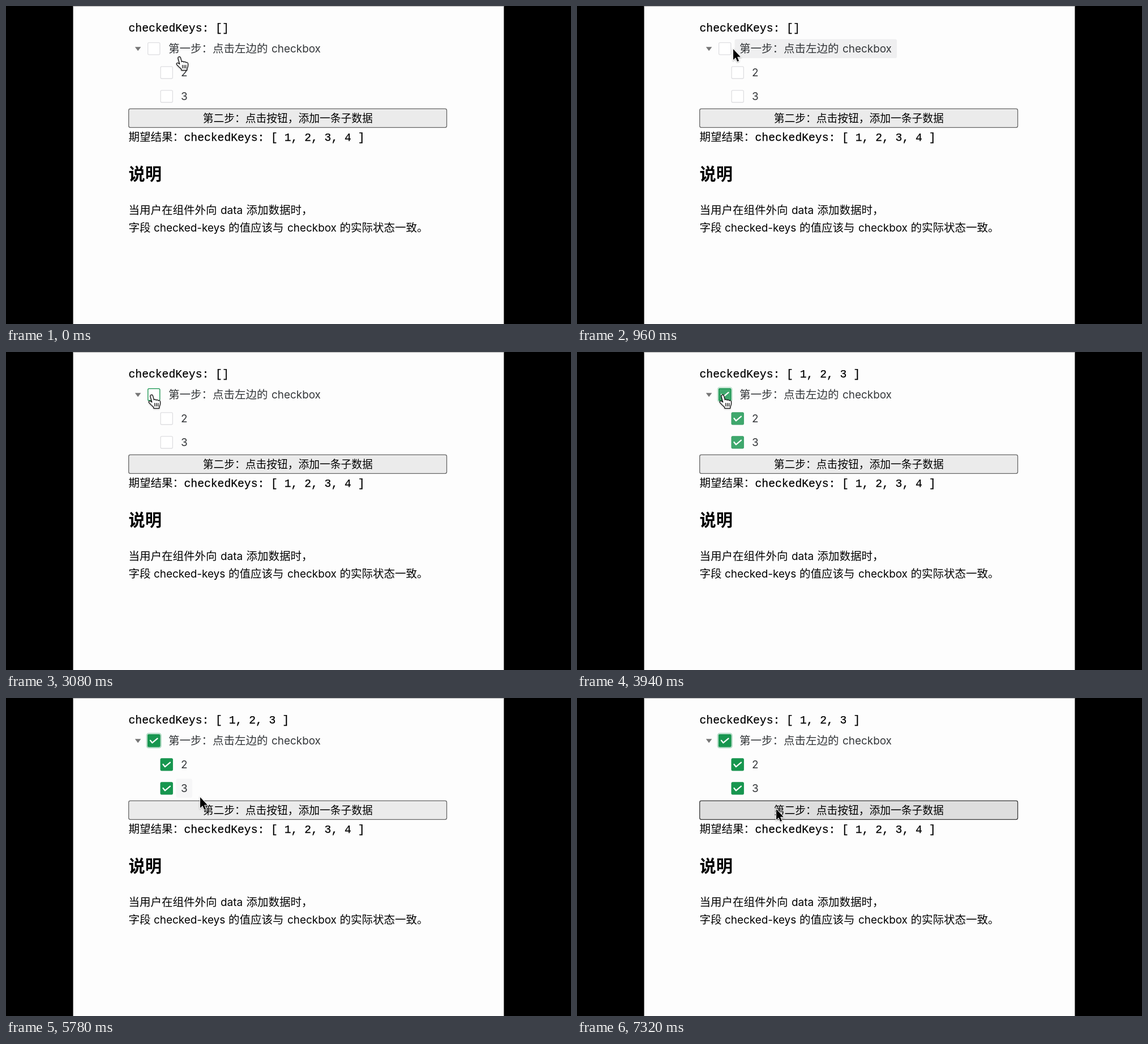
An HTML page that plays this animation: 998 by 561 pixels, repeating every 8000 ms.

```html
<!DOCTYPE html>
<html lang="zh-CN">
<head>
<meta charset="utf-8">
<style>
  html, body { margin: 0; width: 100%; height: 100%; overflow: hidden; background: #000; }
  svg { display: block; width: 998px; height: 561px; }
  text { font: 19.5px "Noto Sans CJK SC", "Noto Sans CJK", sans-serif; white-space: pre; }
  .latin { font-family: Inter, sans-serif; font-size: 18.9px; }
  .mono { font-family: "Liberation Mono", monospace; font-size: 19.7px; stroke: #000; stroke-width: 0.25px; }
  .node { fill: #333639; }
  #arrow, #hand { filter: drop-shadow(0 1px 1px #0005); }
</style>
</head>
<body>
<svg viewBox="0 0 998 561">
  <rect x="118.6" width="760.8" height="561" fill="#fdfdfd"/>
  <rect x="118.6" width="760.8" height="1" fill="#aaa"/>

  <text id="keys" class="mono" x="216.5" y="45"></text>

  <rect id="rowOne" x="278.5" y="58.5" width="286.5" height="33.5" rx="3" fill="#efeff0"/>
  <rect id="rowThree" x="300.5" y="142.5" width="28.5" height="33.5" rx="3" fill="#efeff0"/>
  <path d="M227.8 72.3h10.6l-5.3 7z" fill="#767676"/>
  <g id="boxes"></g>
  <text class="node" x="287" y="82">第一步：点击左边的<tspan class="latin" x="469">checkbox</tspan></text>
  <text class="node latin" x="309" y="124">2</text>
  <text class="node latin" x="309" y="166">3</text>

  <rect id="button" x="216.7" y="181.4" width="561.8" height="33" rx="2.8" stroke-width="1.3"/>
  <text x="497.7" y="205.3" text-anchor="middle" style="font-size:18.75px">第二步：点击按钮，添加一条子数据</text>
  <text x="216.5" y="238.3">期望结果：<tspan class="mono" x="314.5">checkedKeys: [ 1, 2, 3, 4 ]</tspan></text>
  <text x="216.5" y="307" style="font-size:29.2px;font-weight:700">说明</text>
  <text x="216.5" y="367">当用户在组件外向<tspan class="latin" x="379">data</tspan><tspan x="424.5">添加数据时，</tspan></text>
  <text x="216.5" y="398">字段<tspan class="latin" x="261">checked-keys</tspan><tspan x="393">的值应该与</tspan><tspan class="latin" x="497">checkbox</tspan><tspan x="589.5">的实际状态一致。</tspan></text>

  <path id="arrow" d="M0 0V19L4.2 15L7.2 22L10 20.7L7.1 13.8H12.8Z" stroke="#fff" stroke-width="2" paint-order="stroke"/>
  <g id="hand" fill="#fff" stroke="#111" stroke-width="1.3" stroke-linejoin="round" stroke-linecap="round">
    <path d="M-2.2 2C-2.4-1 1.6-1.4 2.4 1.4L4.4 8.6C5 7.2 7.6 7.4 8 9.2C9 7.8 11.4 8.2 12 10C13 8.8 15.2 9.4 15.4 11.5C15.9 15 15.2 18 13.8 20.4L13.6 23.4H4L3.5 21C0 18-2.3 15.7-4.3 13.3C-5.6 11.3-3.4 9.5-1.4 10.9L.8 12.6Z"/>
    <path d="M5.6 14.5l.3 5M8.6 14.5l.2 5M11.6 14.5v5"/>
  </g>
</svg>
<script>
const LOOP = 8000;
const $ = id => document.getElementById(id);
const clamp = v => Math.min(1, Math.max(0, v));
const ease = v => v * v * (3 - 2 * v);
const ramp = (t, from, to) => ease(clamp((t - from) / (to - from)));
const mix = (a, b, k) => a + (b - a) * k;
const gray = v => `rgb(${v},${v},${v})`;

// Pointer stops: time, x, y
const stops = [
  [20, 306, 90], [820, 278, 80], [960, 276, 76], [1560, 258, 77], [2100, 257, 76],
  [4200, 257, 76], [4940, 264, 119], [5040, 264, 119], [5780, 343, 175],
  [5880, 343, 175], [6620, 369, 198], [6720, 369, 198], [7160, 352, 196]
];

// Areas with a hand pointer: left, top, right, bottom
const links = [
  [250, 64, 272.5, 87], [278.5, 58, 565, 92],
  [273, 106, 295, 129], [301, 142, 329, 176]
];

const boxes = [[261.2, 75.2], [283.7, 117.4], [283.7, 159.4]].map(([x, y]) => {
  $('boxes').insertAdjacentHTML('beforeend', `<g transform="translate(${x} ${y})">
    <rect x="-13.6" y="-13.6" width="27.2" height="27.2" rx="4.5" fill="#b4dcc6" opacity="0"/>
    <rect x="-10.6" y="-10.6" width="21.2" height="21.2" rx="2" fill="#fff" stroke="#dedee1" stroke-width="1.3"/>
    <rect x="-10.5" y="-10.5" width="21" height="21" rx="2" fill="none" stroke="#17964f" stroke-width="1.3" opacity="0"/>
    <g opacity="0">
      <rect x="-11.2" y="-11.2" width="22.4" height="22.4" rx="2.5" fill="#17964f"/>
      <path d="M-6.3-.4L-2.9 3.9L6.3-3.8" fill="none" stroke="#fff" stroke-width="2.2" stroke-linecap="round" stroke-linejoin="round"/>
    </g></g>`);
  const [ring, , border, fill] = $('boxes').lastElementChild.children;
  return { ring, border, fill };
});

function pointerAt(t) {
  const i = stops.findIndex(s => s[0] > t);
  if (i === 0) return stops[0].slice(1);
  if (i < 0) return stops[stops.length - 1].slice(1);
  const [a, b] = [stops[i - 1], stops[i]];
  const k = ramp(t, a[0], b[0]);
  return [mix(a[1], b[1], k), mix(a[2], b[2], k)];
}

function draw(t) {
  $('keys').textContent = t < 3660 ? 'checkedKeys: []' : 'checkedKeys: [ 1, 2, 3 ]';
  $('rowOne').setAttribute('opacity', ramp(t, 20, 500) - ramp(t, 2680, 3080));
  $('rowThree').setAttribute('opacity', ramp(t, 5300, 5550) - ramp(t, 5600, 5960));

  boxes[0].border.setAttribute('opacity', ramp(t, 1300, 2100));
  boxes[0].ring.setAttribute('opacity', ramp(t, 3380, 4180));
  for (const box of boxes) box.fill.setAttribute('opacity', ramp(t, 3560, 4080));

  const hover = ramp(t, 5950, 6450);
  $('button').setAttribute('fill', gray(mix(235, 222, hover)));
  $('button').setAttribute('stroke', gray(mix(102, 55, hover)));

  const [x, y] = pointerAt(t);
  const overLink = links.some(([l, top, r, b]) => x >= l && x <= r && y >= top && y <= b);
  for (const id of ['arrow', 'hand']) {
    $(id).setAttribute('transform', `translate(${x} ${y})`);
    $(id).setAttribute('visibility', (id === 'hand') === overLink ? 'visible' : 'hidden');
  }
}

const start = performance.now();
function tick() {
  draw((performance.now() - start) % LOOP);
  requestAnimationFrame(tick);
}
tick();
</script>
</body>
</html>
```
